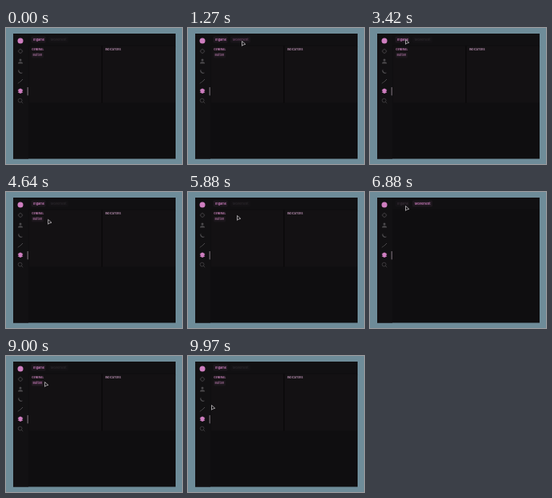
An HTML page with a canvas for the animation above (10000 ms loop, 220x170 px).

```html
<!DOCTYPE html>
<html lang="en">
<head>
<meta charset="utf-8">
<title>Menu tabs</title>
<style>
html, body { margin: 0; width: 100%; height: 100%; overflow: hidden; background: #6e8c99; }
canvas { display: block; width: 220px; height: 170px; }
</style>
</head>
<body>
<canvas id="stage" width="220" height="170"></canvas>
<script>
const ctx = document.getElementById('stage').getContext('2d');
const LOOP = 10000;
const PINK = [206, 126, 192];
const GREY = [76, 74, 77];

const ingameTab = { x: 31.5, y: 10.5, w: 18, h: 8 };
const movementTab = { x: 53, y: 10.5, w: 25, h: 8 };
const button = { x: 32, y: 30.5, w: 15, h: 7 };

// Each move eases the pointer from where it rests to a new spot.
const entry = { x: 209, y: 147 };
const moves = [
  { from: 120, to: 450, x: 122, y: 126 },
  { from: 670, to: 1200, x: 67, y: 16 },
  { from: 2250, to: 2740, x: 44, y: 14 },
  { from: 3820, to: 4210, x: 52, y: 34 },
  { from: 4520, to: 5240, x: 54, y: 33 },
  { from: 5550, to: 5880, x: 61, y: 29 },
  { from: 5880, to: 6100, x: 62, y: 17 },
  { from: 6580, to: 6860, x: 44, y: 17 },
  { from: 8040, to: 8420, x: 52, y: 32 },
  { from: 8610, to: 9000, x: 48, y: 32 },
  { from: 9520, to: 9970, x: 29, y: 61 }
];
const clicks = [1760, 2790, 6130, 7640];
const FADE = 400;

const clamp = v => Math.min(1, Math.max(0, v));
const ease = p => p * p * (3 - 2 * p);
const progress = (time, from, to) => ease(clamp((time - from) / (to - from)));
const mix = (a, b, amount) => a.map((v, i) => v + (b[i] - v) * amount);
const css = color => `rgb(${color.map(Math.round)})`;

function cursorAt(time) {
  return moves.reduce((p, move) => {
    const k = progress(time, move.from, move.to);
    return { x: p.x + (move.x - p.x) * k, y: p.y + (move.y - p.y) * k };
  }, entry);
}

// Clicks alternate between the two tabs: 0 is Ingame, 1 is Movement.
function pageAt(time) {
  return clicks.reduce((page, at, i) => page + (i % 2 ? -1 : 1) * progress(time, at, at + FADE), 0);
}

// Full strength inside the rectangle, fading out within a few pixels.
function hover(rect, p) {
  const dx = Math.max(rect.x - p.x, 0, p.x - rect.x - rect.w);
  const dy = Math.max(rect.y - p.y, 0, p.y - rect.y - rect.h);
  return clamp(1 - Math.hypot(dx, dy) / 6);
}

function box({ x, y, w, h }, color, radius = 0) {
  ctx.fillStyle = css(color);
  ctx.beginPath();
  ctx.roundRect(x, y, w, h, radius);
  ctx.fill();
}

function label(text, x, y, size, color, weight = 600) {
  ctx.font = `${weight} ${size}px Inter, sans-serif`;
  ctx.fillStyle = css(color);
  ctx.fillText(text, x, y);
}

function line(path, color, width = 0.7) {
  ctx.strokeStyle = css(color);
  ctx.lineWidth = width;
  ctx.stroke(new Path2D(path));
}

function fill(path, color) {
  ctx.fillStyle = css(color);
  ctx.fill(new Path2D(path));
}

function disc(x, y, r, color, outline) {
  ctx.beginPath();
  ctx.arc(x, y, r, 0, Math.PI * 2);
  ctx.fillStyle = ctx.strokeStyle = css(color);
  ctx.lineWidth = 0.7;
  outline ? ctx.stroke() : ctx.fill();
}

function drawSidebar() {
  disc(18, 16, 3.5, PINK);

  disc(18, 29, 2.3, GREY, true);
  line('M18 25.8v1M18 31.2v1M14.8 29h1M20.2 29h1', GREY);

  disc(18, 40, 1.5, GREY);
  fill('M15 44.6q0-2.4 3-2.4t3 2.4z', GREY);

  fill('M16.2 51.4a3.2 3.2 0 1 0 4.8 4.3a3.8 3.8 0 0 1-4.8-4.3z', GREY);
  line('M21 64l-3.6 3.6M16.8 67.4l-1.7 2', GREY, 1);

  for (const y of [80.2, 78.7, 77.2]) {
    fill(`M18 ${y - 1.7}l3.4 1.7l-3.4 1.7l-3.4-1.7z`, PINK);
  }
  box({ x: 26.7, y: 74, w: 0.9, h: 10.5 }, [145, 132, 143], 0.4);

  disc(17.6, 90.6, 2.4, GREY, true);
  line('M19.4 92.4l1.8 1.8', GREY);
}

function drawTab(rect, text, x, active, hovered) {
  const idle = mix([42, 39, 43], [118, 73, 110], hovered * 0.8);
  box(rect, mix([20, 18, 21], [29, 23, 29], Math.max(active, hovered * 0.6)), 1);
  label(text, x, 15.8, 3.8, mix(idle, PINK, active));
}

function drawPanels(opacity, hovered) {
  const height = { y: 22.5, h: 71 };
  ctx.globalAlpha = opacity;
  box({ x: 29, w: 90, ...height }, [19, 17, 19], 1);
  box({ x: 121, w: 91, ...height }, [19, 17, 19], 1);
  box({ x: 119.2, w: 1.5, ...height }, [12, 11, 12]);
  label('GENERAL', 32.3, 28.2, 3.2, [190, 124, 177], 700);
  label('INDICATORS', 124, 28.2, 3.2, [178, 139, 171], 700);
  box(button, mix([27, 22, 27], [35, 27, 34], hovered), 1);
  label('Button', 33.5, 35.2, 3.8, mix([174, 116, 163], PINK, hovered), 500);
  ctx.globalAlpha = 1;
}

function drawCursor({ x, y }) {
  const arrow = `M${x + 0.5} ${y + 0.5}v5.8l1.4-1.2l2.9-.8z`;
  ctx.lineJoin = 'round';
  fill(arrow, [17, 16, 18]);
  line(arrow, [196, 193, 196], 0.8);
}

function draw(time) {
  const page = pageAt(time);
  const cursor = cursorAt(time);
  box({ x: 0, y: 0, w: 220, h: 170 }, [110, 140, 153]);
  box({ x: 9, y: 7, w: 203, h: 156.5 }, [15, 14, 16]);
  box({ x: 9, y: 7, w: 19, h: 156.5 }, [18, 17, 19]);
  box({ x: 28, y: 7, w: 184, h: 14 }, [17, 16, 18]);

  drawSidebar();
  drawTab(ingameTab, 'Ingame', 34.3, 1 - page, hover(ingameTab, cursor) * 0.2);
  drawTab(movementTab, 'Movement', 56, page, hover(movementTab, cursor));
  drawPanels(1 - page, hover(button, cursor));
  if (time >= moves[0].from) drawCursor(cursor);
}

const start = performance.now();
function tick() {
  draw((performance.now() - start) % LOOP);
  requestAnimationFrame(tick);
}
tick();
</script>
</body>
</html>
```
